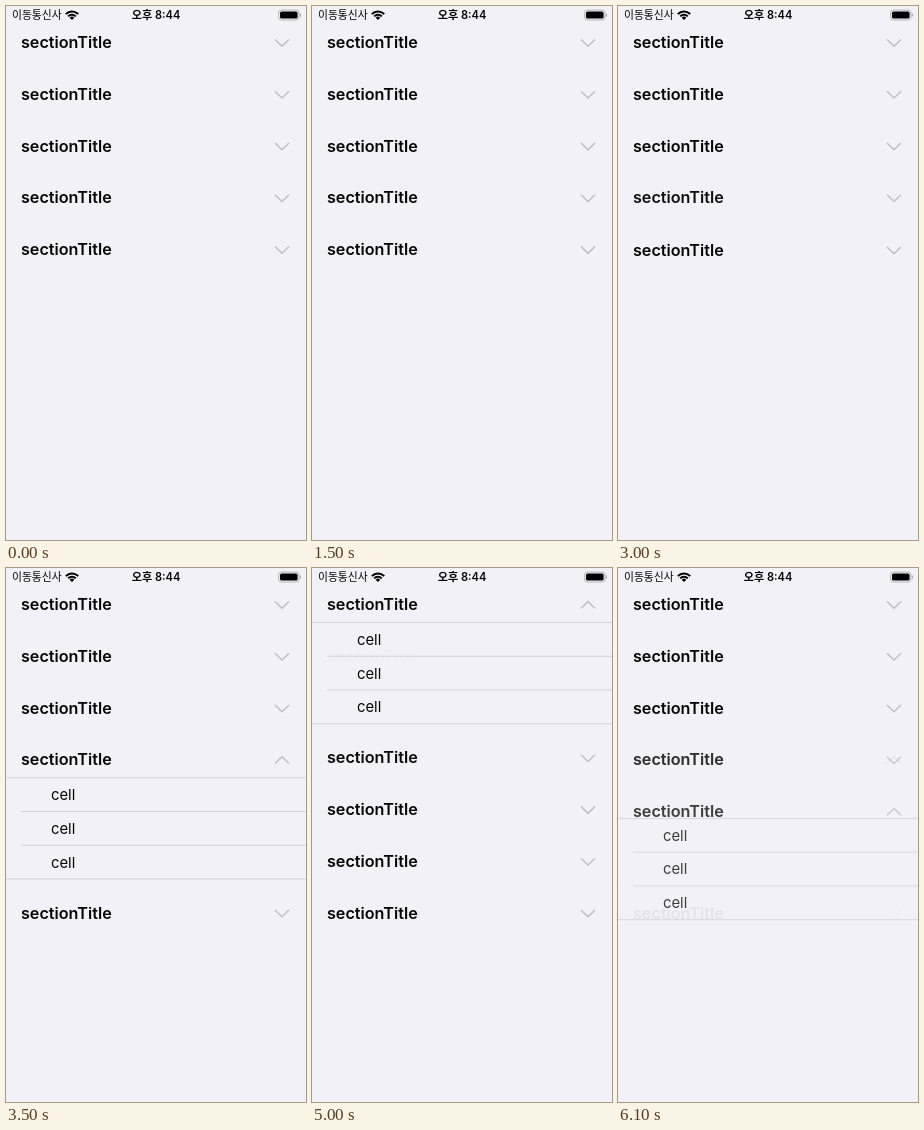
An HTML page with a canvas that plays this animation: 300 px wide and 534 px high, repeating every 6200 ms.

```html
<!DOCTYPE html>
<html lang="ko">
<head>
<meta charset="utf-8">
<style>
  html, body { margin: 0; width: 100%; height: 100%; overflow: hidden; background: #f2f1f7; }
  canvas { display: block; width: 300px; height: 534px; }
</style>
</head>
<body>
<canvas id="stage"></canvas>
<script>
const W = 300, H = 534, LOOP = 6200, STEP = 100;
const BG = '#f2f1f7', LINE = '#d2d1d6', GREY = '#bfbec4';
const SECTIONS = 5, ROWS = 3, PITCH = 51.75, ROW = 33.75, OPEN = 101.5;
const SANS = 'Inter, "Noto Sans CJK KR", "Noto Sans CJK", sans-serif';

// [start, duration, section open before, section open after]; 0 means none
const MOVES = [
  [850, 350, 0, 1], [1200, 300, 1, 0],
  [1530, 295, 0, 2], [1825, 300, 2, 0],
  [2150, 300, 0, 3], [2450, 270, 3, 4], [2720, 295, 4, 0],
  [3050, 450, 0, 4], [3550, 450, 4, 3],
  [4040, 280, 3, 2], [4320, 280, 2, 1],
  [4995, 355, 1, 2], [5350, 320, 2, 3],
  [5670, 200, 3, 4], [5870, 300, 4, 5]
];

const canvas = document.getElementById('stage');
const ctx = canvas.getContext('2d');
const dpr = window.devicePixelRatio || 1;
canvas.width = W * dpr;
canvas.height = H * dpr;

const clamp = v => Math.max(0, Math.min(1, v));
const ease = u => u < .5 ? 2 * u * u : 1 - 2 * (1 - u) ** 2;
const titleY = (k, open) => 36.5 + PITCH * (k - 1) + (open && k > open ? OPEN : 0);

function text(str, x, y, font, align = 'left') {
  ctx.font = font + ' ' + SANS;
  ctx.textAlign = align;
  ctx.fillStyle = '#050507';
  ctx.fillText(str, x, y);
}

function stroke(points, color, width) {
  ctx.beginPath();
  points.forEach(([x, y]) => ctx.lineTo(x, y));
  ctx.strokeStyle = color;
  ctx.lineWidth = width;
  ctx.stroke();
}

function header(y, up, alpha = 1) {
  ctx.globalAlpha = alpha;
  text('sectionTitle', 15, y + 5.5, '600 16.15px');
  const d = up ? -3.4 : 3.4;
  stroke([[269, y + .4 - d], [276, y + .4 + d], [283, y + .4 - d]], GREY, 1.5);
  ctx.globalAlpha = 1;
}

function rows(k, alpha, slide = 0, spread = 0) {
  if (!k || alpha <= 0) return;
  const base = titleY(k, 0) + 18;
  const top = base - slide;
  ctx.save();
  ctx.beginPath();
  ctx.rect(0, base - 12.5, W, H);
  ctx.clip();
  ctx.globalAlpha = alpha;
  for (let i = 0; i < ROWS; i++) {
    const y = top + i * (ROW + spread);
    ctx.fillStyle = BG;
    ctx.fillRect(0, y, W, ROW);
    stroke([[i ? 15 : 0, y], [W, y]], LINE, 1);
    text('cell', 45, y + 22.3, '400 14.8px');
    if (i === ROWS - 1) stroke([[0, y + ROW], [W, y + ROW]], LINE, 1);
  }
  ctx.restore();
}

function statusBar() {
  text('이동통신사', 6, 13.3, '400 10.8px');
  text('오후 8:44', 150, 13.3, '600 11.1px', 'center');

  // Wi-Fi
  for (const [r, w] of [[1.6, 3.2], [5.2, 1.9], [8.5, 1.9]]) {
    ctx.beginPath();
    ctx.arc(66, 14, r, -Math.PI * .76, -Math.PI * .24);
    ctx.strokeStyle = '#000';
    ctx.lineWidth = w;
    ctx.stroke();
  }

  // Battery
  ctx.beginPath();
  ctx.roundRect(272.6, 4.1, 20.4, 9.9, 2.8);
  ctx.strokeStyle = '#a4a4a8';
  ctx.lineWidth = .8;
  ctx.stroke();
  ctx.beginPath();
  ctx.roundRect(274, 5.5, 17.6, 7.1, 1.6);
  ctx.fillStyle = '#000';
  ctx.fill();
  ctx.fillStyle = '#a4a4a8';
  ctx.fillRect(293.9, 7.5, 1, 3.1);
}

function draw(t) {
  const [start, span, from, to] = MOVES.filter(m => m[0] <= t).pop() || [0, 1, 0, 0];
  const u = clamp((t - start) / span), p = ease(u);
  ctx.setTransform(dpr, 0, 0, dpr, 0, 0);
  ctx.fillStyle = BG;
  ctx.fillRect(0, 0, W, H);

  const all = [...Array(SECTIONS).keys()].map(i => i + 1);
  const fading = all.filter(k => k === from || k === to);
  const moving = all.filter(k => !fading.includes(k));

  // Outgoing section state, then the incoming one above it
  fading.forEach(k => header(titleY(k, from), k === from, 1 - u));
  rows(from, 1 - Math.min(1, 2 * u * u), p * OPEN);
  fading.forEach(k => header(titleY(k, to), k === to, u));
  const upward = to && to < from;
  rows(to, u, upward ? 0 : (1 - p) * OPEN, upward ? (1 - p) * 23 : 0);

  moving.forEach(k => {
    const a = titleY(k, from), b = titleY(k, to);
    header(a + (b - a) * p, false);
  });
  statusBar();
}

const origin = performance.now();
function tick() {
  const t = (performance.now() - origin) % LOOP;
  draw(Math.floor(t / STEP) * STEP);
  requestAnimationFrame(tick);
}
tick();
</script>
</body>
</html>
```
